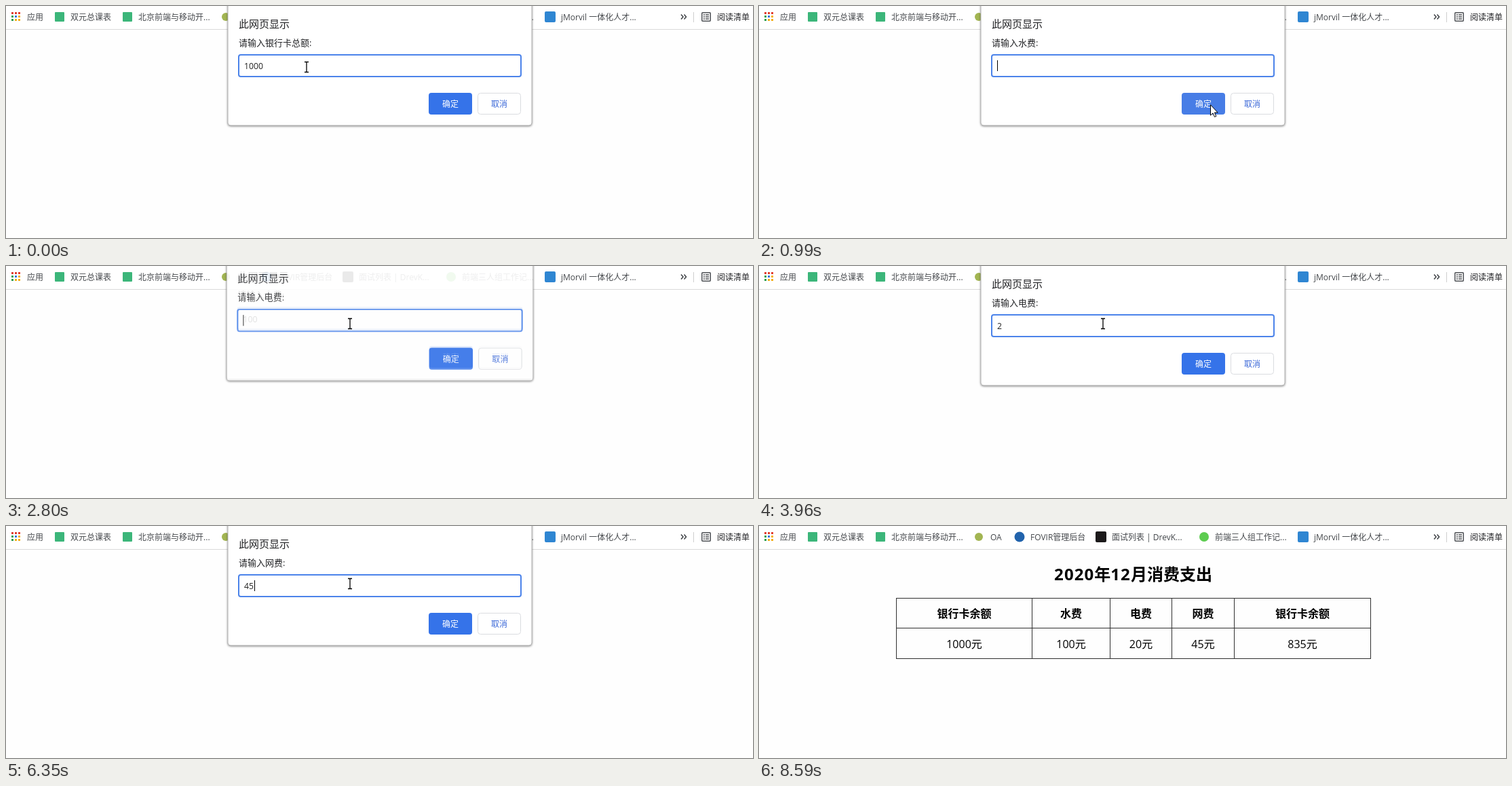
Animation, 1101 px wide and 342 px high, one loop 9.66 s. Source, as an HTML page:

```html
<!DOCTYPE html>
<html lang="zh-CN">
<head>
<meta charset="utf-8">
<title>消费支出</title>
<style>
  html, body { margin: 0; width: 100%; height: 100%; overflow: hidden; background: #fefefe; }
  svg { display: block; position: absolute; left: 0; top: 0; }
  text { font-family: "Open Sans", "Noto Sans CJK SC", "Noto Sans CJK", sans-serif; white-space: pre; }
  .mark { font-size: 12px; fill: #45484c; }
  .mid { text-anchor: middle; }
  .panel { fill: #fff; stroke: #b4b4b4; stroke-width: 1; filter: drop-shadow(0 1px 1.5px rgba(0, 0, 0, .45)); }
  .cell { font-size: 16px; fill: #000; text-anchor: middle; }
  .head { font-weight: 700; }
  .title { font-size: 24px; font-weight: 700; text-anchor: middle; }
  .title tspan { letter-spacing: 1.1px; }
</style>
</head>
<body>
<svg width="1101" height="342" viewBox="0 0 1101 342">
  <g id="bar"></g>
  <g id="page"></g>
  <g id="popups"></g>
  <g id="mouse"></g>
</svg>
<script>
const LOOP = 9660;
const $ = id => document.getElementById(id);
const text = (x, y, s, attrs = '') => `<text x="${x}" y="${y}" ${attrs}>${s}</text>`;
const rect = (x, y, w, h, attrs) => `<rect x="${x}" y="${y}" width="${w}" height="${h}" ${attrs}/>`;
const circle = (x, y, r, fill) => `<circle cx="${x}" cy="${y}" r="${r}" fill="${fill}"/>`;

function drawBar() {
  const red = '#e2402f', green = '#2f9e50', amber = '#f3b01c', blue = '#3b78e0';
  const dots = [red, red, red, green, blue, amber, green, amber, amber];
  const labels = [
    [31, '应用'], [95, '双元总课表'], [195, '北京前端与移动开...'], [341, 'OA'],
    [400, 'FOVIR管理后台'], [520, '面试列表 | DrevK...'], [672, '前端三人组工作记...'],
    [818, 'jMorvil 一体化人才...']
  ];
  return rect(0, 0, 1101, 34, 'fill="#fff"') + rect(0, 34, 1101, 1, 'fill="#dadada"') +
    dots.map((c, i) => rect(8 + i % 3 * 5, 9 + Math.floor(i / 3) * 5, 3, 3, `fill="${c}"`)).join('') +
    rect(72, 9, 14, 14, 'rx="1" fill="#3cb67a"') +
    rect(172, 9, 14, 14, 'rx="1" fill="#3cb67a"') +
    circle(324, 16, 6, '#a2b552') +
    circle(384, 16, 7.5, '#2263ac') +
    rect(496, 8, 16, 16, 'rx="2" fill="#1c1a1b"') +
    circle(656, 16, 7, '#5dcc50') +
    rect(794, 8, 16, 16, 'rx="2" fill="#2f86d2"') +
    labels.map(([x, s]) => text(x, 21, s, 'class="mark"')).join('') +
    '<path d="M995 12.5l3 3.5-3 3.5M999.5 12.5l3 3.5-3 3.5" fill="none" stroke="#45484c" stroke-width="1.6"/>' +
    rect(1013, 9, 1, 15, 'fill="#cfcfcf"') +
    rect(1025.75, 9.75, 12.5, 12.5, 'rx="1" fill="none" stroke="#505357" stroke-width="1.5"') +
    '<path d="M1028 13h2m1 0h5m-8 3h2m1 0h5m-8 3h2m1 0h5" stroke="#505357" stroke-width="1.3"/>' +
    text(1048, 21, '阅读清单', 'class="mark" style="fill:#202124"');
}

function drawPage() {
  const cols = [202, 402, 517, 608, 700, 901];
  const rows = [['银行卡余额', '水费', '电费', '网费', '银行卡余额'],
                ['1000元', '100元', '20元', '45元', '835元']];
  const cells = rows.map((row, r) => row.map((s, c) =>
    text((cols[c] + cols[c + 1] + 1) / 2, 135 + r * 45, s, `class="cell ${r ? '' : 'head'}"`)).join('')).join('');
  return text(551.5, 80, '<tspan>2020</tspan>年<tspan>12</tspan>月消费支出', 'class="title"') +
    cols.map(x => rect(x, 106, 1, 90, 'fill="#303030"')).join('') +
    [106, 150, 195].map(y => rect(202, y, 700, 1, 'fill="#303030"')).join('') + cells;
}

// pose: [lift, scale, opacity]
function drawPopup(label, value, caret, hover, pose) {
  const [lift, scale, alpha] = pose;
  const caretX = value ? 352 + value.length * 7 : 351;
  return `<g opacity="${alpha}" transform="translate(551 ${-lift}) scale(${scale}) translate(-551 0)">` +
    rect(327, -20, 448, 196, 'rx="4" class="panel"') +
    text(343, 32, '此网页显示', 'font-size="15" fill="#202124"') +
    text(343, 59, `请输入${label}:`, 'font-size="13" fill="#202124"') +
    rect(343, 72, 416, 32, 'rx="3" fill="#fff" stroke="#4b83ea" stroke-width="2"') +
    text(351, 93, value, 'font-size="12.25" fill="#222"') +
    (caret ? rect(caretX, 80, 1, 16, 'fill="#000"') : '') +
    rect(623, 128, 64, 32, `rx="4" fill="${hover ? '#477de6' : '#3573e9'}"`) +
    text(655, 149, '确定', 'class="mid" font-size="12" font-weight="500" fill="#fff"') +
    rect(695.5, 128.5, 63, 31, 'rx="4" fill="#fff" stroke="#dadce0"') +
    text(727, 149, '取消', 'class="mid" font-size="12" fill="#3b68d8"') + '</g>';
}

const BEAM = '<path d="M-3 -7.5h2.5l.5 .5 .5 -.5h2.5M0 -7v14M-3 7.5h2.5l.5 -.5 .5 .5h2.5" fill="none" stroke="#000" stroke-width="1.3"/>';
const ARROW = '<path d="M.5 .7V16.2L4 12.9l2.5 5.6 2.4-1-2.5-5.4h4.8z" fill="#fff" stroke="#000"/>';

function drawMouse(kind, x, y) {
  const shape = { beam: BEAM, arrow: ARROW }[kind] || '';
  return `<g transform="translate(${x} ${y})">${shape}</g>`;
}

const REST = [0, 1, 1], RISING = [8.5, 1.008, .9], NEAR = [2.6, 1.003, .97];
const FADED = [11, 1.008, .12], LEAVING = [9, 1.008, .3];

// each step changes only the listed parts of the state
const steps = [
  [0, { label: '银行卡总额', value: '1000', caret: false, hover: false, pose: REST, old: null, table: false, mouse: ['beam', 443, 90] }],
  [250, { caret: true, mouse: ['beam', 466, 91] }],
  [370, { mouse: ['arrow', 549, 110] }],
  [490, { mouse: ['arrow', 630, 136] }],
  [610, { mouse: ['arrow', 664, 147] }],
  [750, { label: '水费', value: '', pose: RISING, old: ['银行卡总额', '1000'], mouse: ['arrow', 665, 145] }],
  [870, { pose: REST, old: null }],
  [990, { hover: true }],
  [1110, { hover: false, mouse: ['arrow', 632, 121] }],
  [1230, { mouse: ['beam', 548, 94] }],
  [1350, { mouse: ['beam', 507, 85] }],
  [1850, { value: '1' }],
  [2270, { value: '10' }],
  [2390, { value: '100' }],
  [2800, { label: '电费', value: '', pose: RISING, old: ['水费', '100'] }],
  [2920, { pose: REST, old: null }],
  [3310, { caret: false }],
  [3460, { value: '2', caret: true }],
  [3960, { caret: false }],
  [4610, { value: '20', caret: true }],
  [5010, { label: '网费', value: '', pose: NEAR }],
  [5140, { pose: REST }],
  [5420, { caret: false }],
  [5950, { caret: true }],
  [6230, { value: '4' }],
  [6350, { value: '45' }],
  [6850, { table: true, pose: LEAVING }],
  [7000, { pose: null }],
  [8330, { mouse: ['arrow', 586, 205] }],
  [8450, { mouse: ['arrow', 648, 287] }],
  [8590, { mouse: [] }]
];

let state = {};
const timeline = steps.map(([at, change]) => [at, state = { ...state, ...change }]);

$('bar').innerHTML = drawBar();
$('page').innerHTML = drawPage();

let shown = null;
function show(s) {
  if (s === shown) return;
  shown = s;
  $('page').style.display = s.table ? '' : 'none';
  $('popups').innerHTML =
    (s.pose ? drawPopup(s.label, s.value, s.caret, s.hover, s.pose) : '') +
    (s.old ? drawPopup(s.old[0], s.old[1], false, false, FADED) : '');
  const [kind, x = 0, y = 0] = s.mouse;
  $('mouse').innerHTML = drawMouse(kind, x, y);
}

const start = performance.now();
function tick() {
  const t = (performance.now() - start) % LOOP;
  show(timeline.findLast(([at]) => at <= t)[1]);
  requestAnimationFrame(tick);
}
tick();
</script>
</body>
</html>
```
